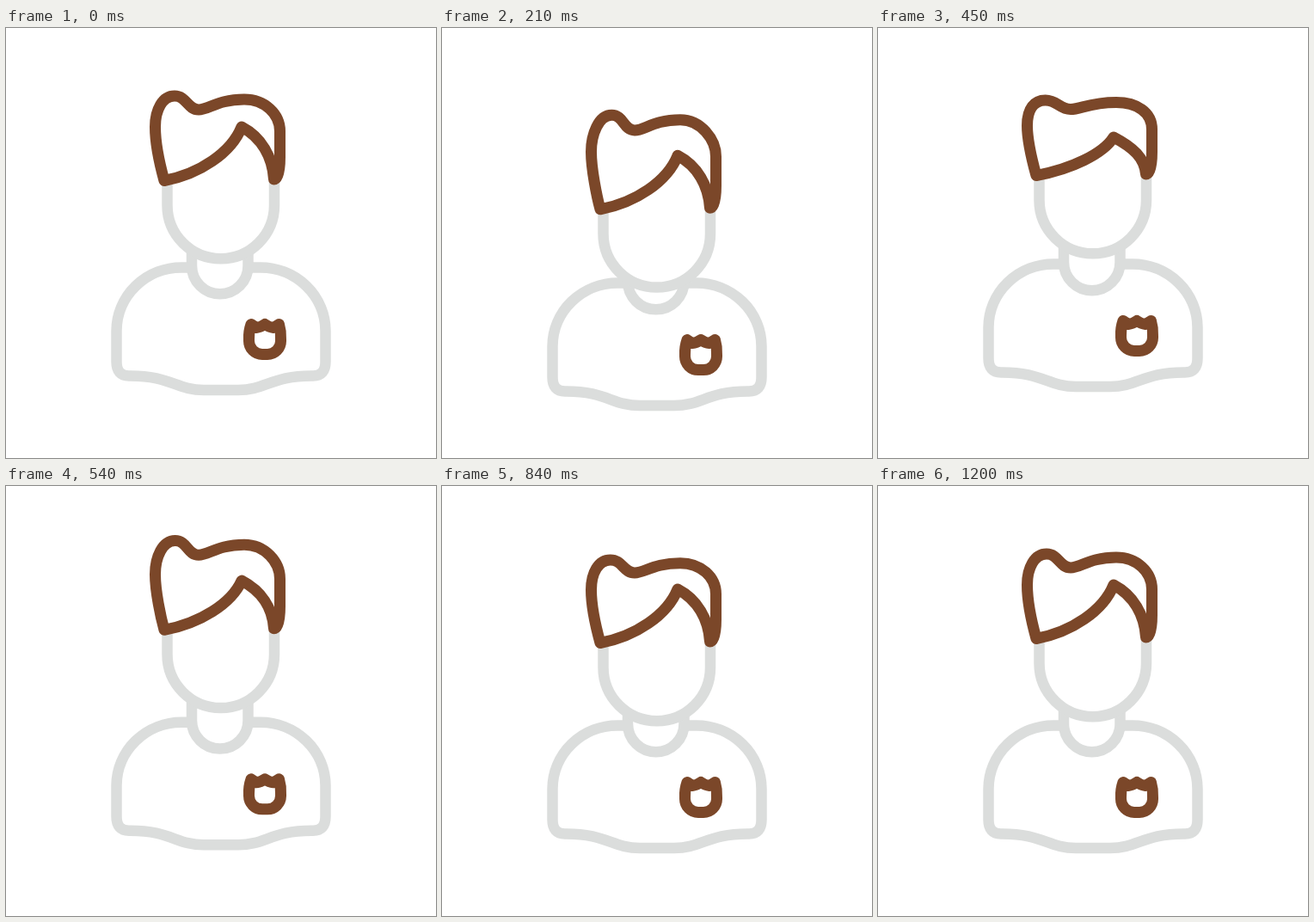
These frames come from a looping animation (500 px wide and 500 px high, 1.83 s). An HTML page:

```html
<!DOCTYPE html>
<html lang="en">
<head>
<meta charset="utf-8">
<title>Bouncing person</title>
<style>
  html, body { margin: 0; width: 100%; height: 100%; overflow: hidden; background: #fff; }
  svg { display: block; width: 100vw; height: 100vh; }
  path { fill: none; stroke-linejoin: round; }
  .grey { stroke: #dbdddc; stroke-width: 12.5; }
  .brown { stroke: #7b4729; stroke-width: 13; }
  .face { fill: #fff; }
</style>
</head>
<body>
<svg viewBox="0 0 500 500">
  <g id="body">
    <path class="grey" d="M216 246V276.500A32.750 32.750 0 0 0 281.500 276.500V246"/>
    <path class="grey" d="M212 278.500H204A75.500 74 0 0 0 128.500 352V388Q128.500 404.500 143 404.500C191 404 198 421 230 421H270C302 421 309 404 357 404.500Q371.500 404.500 371.500 388V352A75.500 74 0 0 0 296 278.500H286"/>
    <path class="brown" d="M285 344.500Q282 353 282.500 362V364A15.500 15.500 0 0 0 298 379.500H304A15.500 15.500 0 0 0 319.500 364V362Q320 353 317.500 344.500L311 348.500Q306 348 301 344.500Q296 348 291 348.500Z"/>
  </g>
  <g id="head">
    <path class="grey face" d="M187.500 178V206A62.250 62.250 0 0 0 312 206V178"/>
    <path class="brown" id="hair"/>
  </g>
</svg>
<script>
const LOOP = 1830, STEP = 30, END = 1200;
const [body, head, hair] = ["body", "head", "hair"].map(id => document.getElementById(id));

// Eased progress from 0 to 1 between two times in ms.
function move(t, from, to) {
  const u = Math.min(1, Math.max(0, (t - from) / (to - from)));
  return u * u * (3 - 2 * u);
}

// The body drops, springs slightly too high and settles.
const bodyY = t => 18.8 * move(t, 0, 180) - 23 * move(t, 180, 465) + 4.2 * move(t, 465, 800);

// The head follows the body later and swings further.
const headY = t => 33.3 * move(t, 0, 210) - 43.8 * move(t, 210, 510)
  + 15.5 * move(t, 510, 840) - 5 * move(t, 840, 1170);

// The hair lags behind the head: negative is stretched, positive is flattened.
const squash = t => -11 * move(t, 0, 210) + 31 * move(t, 210, 360)
  - 32 * move(t, 360, 615) + 14 * move(t, 615, 850) - 2 * move(t, 850, 1170);

const partY = t => 25 * (move(t, 210, 360) - move(t, 360, 615));

function hairPath(top, part) {
  const x = 196 - 0.12 * top;
  const crown = 79 + top, front = 83 + top * 0.87;
  const low = 95 + top * (top < 0 ? 0.85 : 0.5);
  const left = 115 + top * 0.4, right = 120 + top * 0.35;
  return `M184 177.500C180 163 173.500 ${left + 20} 173.500 ${left}`
    + `C173.500 ${left - 20} 182 ${crown} ${x} ${crown}`
    + `C${x + 14} ${crown} 211 ${low} 224 ${low}`
    + `C236 ${low} 246 ${front} 277 ${front}`
    + `C301 ${front} 318.500 ${right - 20} 318.500 ${right}`
    + `V150C318.500 165 316 176 311.500 176`
    + `C310 ${150 + part * 0.4} 297 ${127 + part} 274 ${115 + part}`
    + `C262 ${145 + part * 0.4} 225 170 184 177.500Z`;
}

const shift = (el, y) => el.setAttribute("transform", `translate(0 ${y})`);

function draw(ms) {
  const t = Math.min(Math.floor((ms % LOOP) / STEP) * STEP, END);
  shift(body, bodyY(t));
  shift(head, headY(t));
  hair.setAttribute("d", hairPath(squash(t), partY(t)));
}

const start = performance.now();
function tick() {
  draw(performance.now() - start);
  requestAnimationFrame(tick);
}
tick();
</script>
</body>
</html>
```
